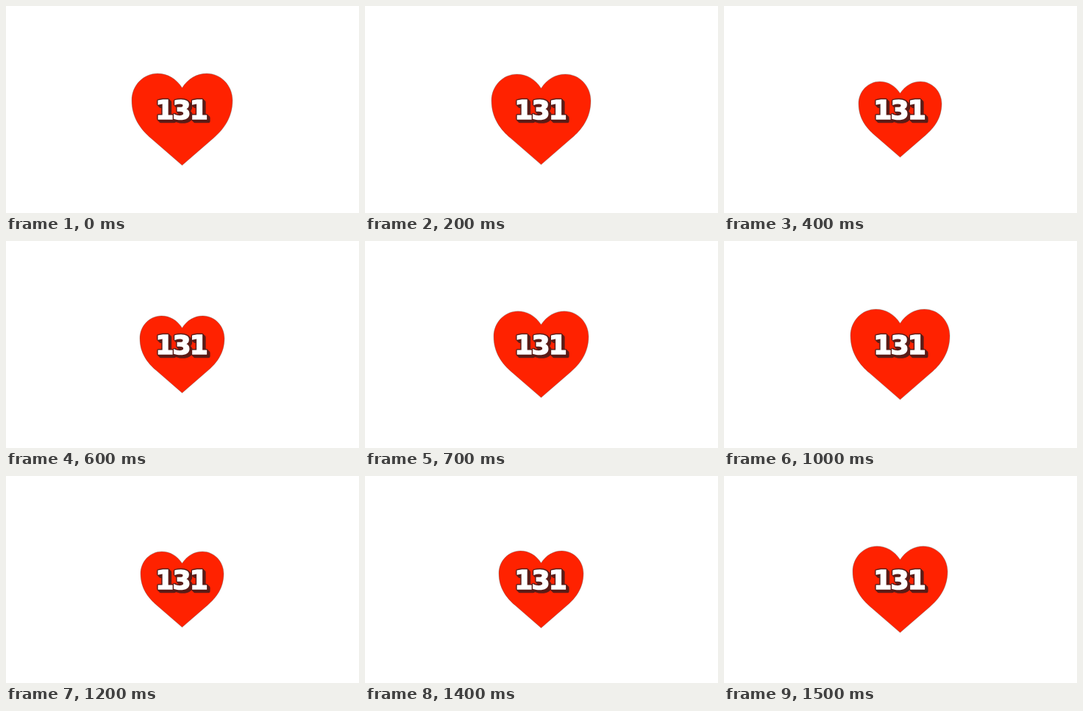
An HTML page that plays this animation: 480 px wide and 282 px high, repeating every 1600 ms.

```html
<!DOCTYPE html>
<html lang="en">
<head>
<meta charset="utf-8">
<title>Beating heart</title>
<style>
  html, body { margin: 0; width: 100%; height: 100%; overflow: hidden; background: #fff; }
  svg { display: block; width: 100%; height: 100%; }
  text { font: bold 36px "DejaVu Sans", sans-serif; letter-spacing: -1.7px; text-anchor: middle; }
  #heart { fill: #ff2200; stroke: #4a5552; stroke-opacity: .55; stroke-width: .6; vector-effect: non-scaling-stroke; }
  #shade { fill: #5a1c17; stroke: #5a1c17; stroke-width: 4.5; stroke-linejoin: round; }
  #face { fill: #fff; stroke: #fff; stroke-width: 1.6; }
</style>
</head>
<body>
<svg viewBox="0 0 480 282">
  <path id="heart" d="M0-43C-8-55.5-20-62.5-33.5-62.5C-53-62.5-68.5-46-68.5-26
    C-68.5-2-56 14-42 26L0 62.5L42 26C56 14 68.5-2 68.5-26
    C68.5-46 53-62.5 33.5-62.5C20-62.5 8-55.5 0-43Z"/>
  <g id="shade"></g>
  <text id="face" x="238.2" y="153.6">131</text>
</svg>
<script>
  const STEP = 100, BASE = 137;
  // heart width at each step of the two beats
  const widths = [137, 139, 135, 122, 113, 112, 115, 129,
                  139, 139, 135, 122, 113, 112, 115, 129];
  const heart = document.getElementById("heart");
  const shade = document.getElementById("shade");
  const face = document.getElementById("face");

  for (let d = 0; d <= 3; d++) {
    const copy = face.cloneNode(true);
    copy.removeAttribute("id");
    copy.setAttribute("aria-hidden", "true");
    copy.setAttribute("transform", `translate(${d} ${d})`);
    shade.append(copy);
  }

  function draw(ms) {
    const scale = widths[Math.floor(ms / STEP) % widths.length] / BASE;
    heart.setAttribute("transform", `translate(239.5 154.5) scale(${scale})`);
  }

  const start = performance.now();
  function tick() {
    draw(performance.now() - start);
    requestAnimationFrame(tick);
  }
  tick();
</script>
</body>
</html>
```
